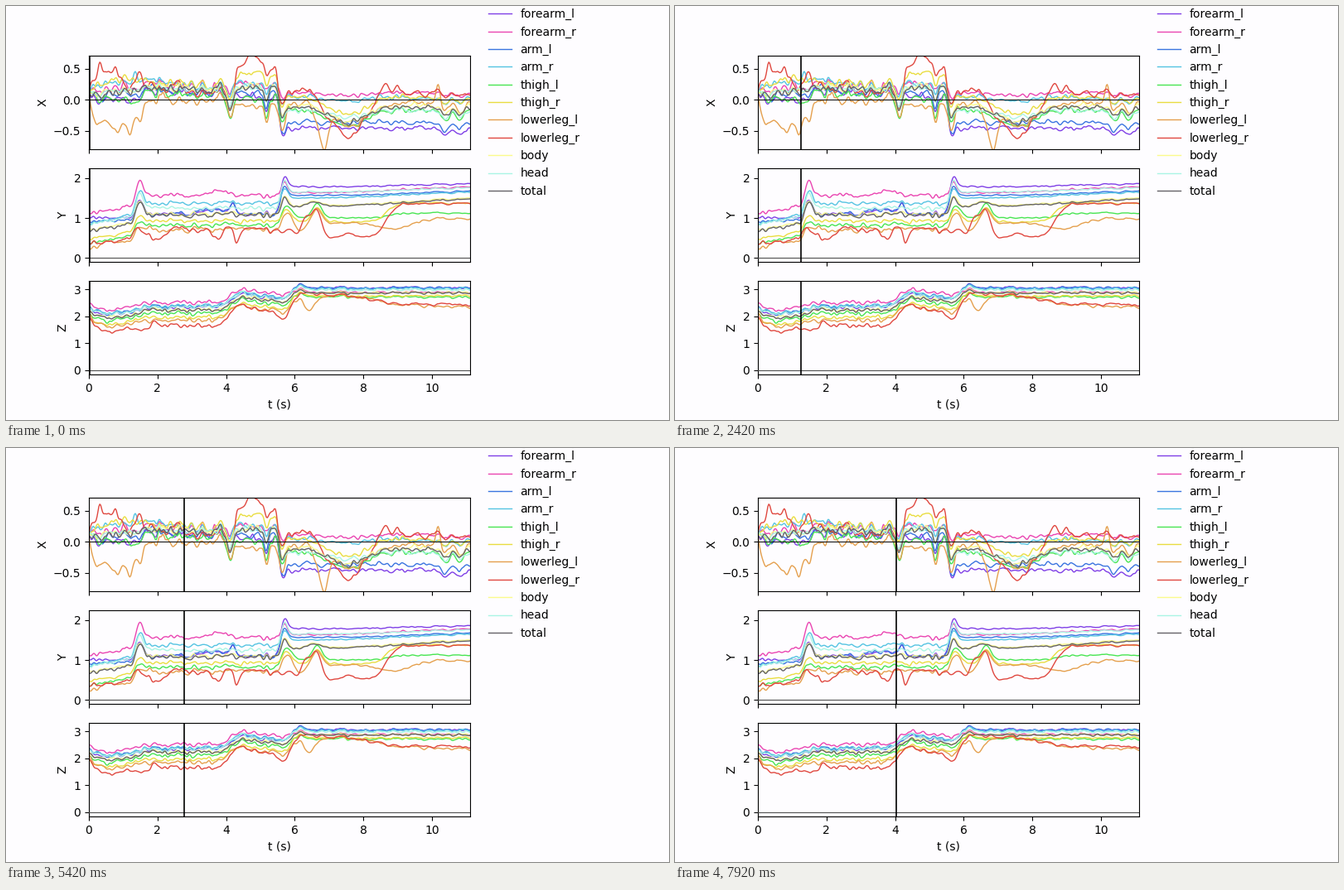
Write a matplotlib script that moves like this. It is 800x500 px and loops after 8 s.

```python
import numpy as np
import matplotlib.pyplot as plt
from matplotlib.animation import FuncAnimation
from matplotlib.lines import Line2D

FRAMES = 96
LOOP_MS = 8000
T_END = 11.115
START, STEP = 0.021, 0.04236  # cursor time and advance per frame, in seconds

COLORS = {
    "forearm_l": "#7f3fe6", "forearm_r": "#ea45b2", "arm_l": "#3a74e0",
    "arm_r": "#55c4e2", "thigh_l": "#48e552", "thigh_r": "#e9dd40",
    "lowerleg_l": "#e5a04e", "lowerleg_r": "#e04840", "body": "#fbfb8c",
    "head": "#aaf5e4", "total": "#646266",
}
LEGS = ("thigh_l", "thigh_r", "lowerleg_l", "lowerleg_r")
SHINS = LEGS[2:]

# first level, middle level, lift, dip, late level, sag
X_MOTION = {
    "forearm_l": (0, .1, -.05, .2, -.46, 0),
    "forearm_r": (.2, .2, .05, .1, .1, .03),
    "arm_l": (.07, .12, 0, .27, -.37, 0),
    "arm_r": (.25, .24, .02, .18, .03, .05),
    "thigh_l": (0, .08, -.06, .34, -.17, .26),
    "thigh_r": (.3, .24, .2, .2, .03, .27),
    "lowerleg_l": (-.39, -.04, -.02, .28, -.04, .42),
    "lowerleg_r": (.44, .13, .48, .2, .1, .73),
    "head": (.14, .17, .03, .25, -.18, .1),
    "total": (.12, .15, .06, .3, -.12, .26),
}
# start level, middle level, late level, end level, kick
Y_MOTION = {
    "forearm_l": (1, 1.1, 1.78, 1.85, .34),
    "forearm_r": (1.1, 1.57, 1.63, 1.78, .36),
    "arm_l": (.88, 1.1, 1.56, 1.67, .3),
    "arm_r": (.85, 1.37, 1.5, 1.65, .34),
    "thigh_l": (.35, .82, 1, 1.12, .12),
    "thigh_r": (.45, .93, .9, 1.37, .14),
    "lowerleg_l": (.25, .72, .88, 1, .05),
    "lowerleg_r": (.35, .72, .5, 1.36, .02),
    "head": (.85, 1.25, 1.65, 1.75, .4),
    "total": (.68, 1.08, 1.28, 1.48, .32),
}
# offset from the total before and after the stand at 5.9 s
Z_OFFSET = {
    "forearm_l": (.12, .2), "forearm_r": (.29, .03), "arm_l": (.15, .2),
    "arm_r": (.17, .17), "thigh_l": (-.1, -.14), "thigh_r": (-.25, -.1),
    "lowerleg_l": (-.35, -.47), "lowerleg_r": (-.52, -.42),
    "head": (.13, .12), "total": (0, 0),
}

plt.rcParams.update({"font.family": "DejaVu Sans", "font.size": 10})
rng = np.random.default_rng(11)
time = np.linspace(0, T_END, 420)


def bump(center, width):
    return np.exp(-0.5 * ((time - center) / width) ** 2)


def rise(center, width):
    return 0.5 + 0.5 * np.tanh((time - center) / width)


def blend(a, b, k):
    return a + (b - a) * k


def jitter(early, late, width=1.5):
    """Smooth seeded noise that calms down after the stand."""
    k = np.arange(-12, 13)
    kernel = np.exp(-0.5 * (k / width) ** 2)
    n = np.convolve(rng.normal(size=time.size + 24), kernel, "valid")
    return n / n.std() * blend(early, late, rise(5.8, 0.2))


def x_curves():
    shake = jitter(.025, .012)
    settle = 1 - np.exp(-time / 0.15)
    lift = (rise(4.27, .06) - rise(5.5, .05)) * (.75 + .25 * bump(4.9, .25))
    dip = (bump(4.1, .1) + bump(5.17, .06) + .5 * bump(5.62, .07)
           + .5 * bump(10.4, .13) + .4 * bump(10.8, .1))
    curves = {}
    for name, (first, mid, up, down, late, sag) in X_MOTION.items():
        v = blend(.1, first, settle)
        v = blend(v, mid + .06 * bump(1.8, .3), rise(1.57, .06))
        v = blend(v, late, rise(5.55, .06))
        curves[name] = v + up * lift - down * dip - sag * bump(7.55, .5) + shake
    curves["arm_r"] += .2 * bump(1.35, .06)
    curves["lowerleg_l"] += (-.15 * bump(1.2, .07) - .3 * bump(5.65, .12)
                             - .53 * bump(6.85, .12) - .15 * bump(6.6, .12)
                             + .28 * bump(10.18, .06))
    curves["lowerleg_r"] += (.2 * bump(.32, .05) - .3 * bump(1.2, .12)
                             + .16 * bump(8.63, .12) + .12 * bump(9, .05)
                             + .07 * bump(6.4, .3))
    return curves


def y_curves():
    sway = jitter(.02, .007)
    curves = {}
    for name, (start, mid, late, end, kick) in Y_MOTION.items():
        v = blend(start, mid, .4 * np.minimum(time / 1.1, 1)
                  + .6 * rise(1.33, .1))
        leg = name in LEGS
        drift = rise(8.65, .3) if leg else np.clip((time - 7) / 4.1, 0, 1)
        v = blend(v, blend(late, end, drift), rise(5.57, .07))
        v += kick * (bump(1.49, .1) + .8 * bump(5.71, .09))
        if leg:
            v += .25 * bump(5.82, .13) + .36 * bump(6.66, .14)
        curves[name] = v + sway
    curves["total"] += .12 * bump(6.6, .2)
    for arm in ("forearm_l", "arm_l"):
        curves[arm] += .12 * bump(3.6, .3) + .22 * bump(4.2, .08)
    curves["forearm_r"] += .13 * bump(3.7, .25)
    curves["lowerleg_l"] -= .25 * bump(9, .5) + .18 * bump(6.15, .15)
    curves["lowerleg_r"] += (.45 * bump(6.3, .12) + .35 * bump(6.6, .15)
                             + .12 * bump(7.6, .15) - .25 * bump(1.95, .2)
                             - .2 * bump(3.75, .12) - .28 * bump(4.3, .07))
    return curves


def z_curves():
    bob = jitter(.035, .018)
    total = (1.98 + .14 * np.exp(-time / .3) + .09 * rise(1.2, .2)
             + .17 * rise(1.57, .05) + .36 * rise(4.05, .18)
             + .27 * rise(5.9, .08) + .1 * bump(4.5, .2)
             - .08 * bump(5.65, .1) + .09 * bump(6.15, .12) + bob)
    curves = {}
    for name, (early, late) in Z_OFFSET.items():
        curves[name] = total + blend(early, late, rise(5.9, .1))
    for shin in SHINS:
        curves[shin] += (.38 * bump(7.3, .8) + .12 * bump(4.3, .2)
                         + .3 * np.exp(-time / .2) - .15 * bump(5.68, .1))
    curves["lowerleg_l"] -= .42 * bump(6.42, .12)
    curves["lowerleg_r"] += (.2 * bump(6.4, .25) + .15 * bump(4.9, .5)
                             - .15 * bump(1.6, .15))
    return curves


fig, axes = plt.subplots(3, 1, sharex=True, figsize=(8, 5), dpi=100,
                         facecolor="#fefdff")
fig.subplots_adjust(left=0.125, right=0.7, top=0.88, bottom=0.11, hspace=0.2)

# label, limits, ticks, curves, noise before and after the stand, zero line
panels = [
    ("X", (-0.803, 0.707), [-0.5, 0, 0.5], x_curves(), .03, .016, "#151515"),
    ("Y", (-0.1, 2.247), [0, 1, 2], y_curves(), .018, .007, "#505050"),
    ("Z", (-0.154, 3.33), [0, 1, 2, 3], z_curves(), .022, .014, "#505050"),
]
cursors = []
for ax, (label, limits, ticks, curves, early, late, zero) in zip(axes, panels):
    curves["body"] = curves["total"] + 0.02
    for name, color in COLORS.items():
        wobble = jitter(early, late)
        if name in SHINS:
            wobble += jitter(1.5 * early, 2 * late, 4)
        ax.plot(time, curves[name] + wobble, color=color, lw=1)
    ax.set_facecolor("#fefdff")
    ax.set(ylabel=label, ylim=limits, yticks=ticks, xlim=(0, T_END))
    ax.axhline(0, color=zero, lw=0.8, zorder=3)
    cursors.append(ax.axvline(START, color="black", lw=1.2, zorder=4))
axes[-1].set(xlabel="t (s)", xticks=range(0, 11, 2))

# Legend column, in pixels from the top left corner
for k, (name, color) in enumerate(COLORS.items()):
    row = 9.2 + 21.37 * k
    fig.add_artist(Line2D([581.5 / 800, 609.5 / 800], [1 - row / 500] * 2,
                          color=color, lw=1))
    fig.text(620.5 / 800, 1 - (row + 4.9) / 500, name, va="baseline")


def update(i):
    for cursor in cursors:
        cursor.set_xdata([START + STEP * i] * 2)
    return cursors


anim = FuncAnimation(fig, update, frames=FRAMES, interval=LOOP_MS / FRAMES,
                     repeat=True, repeat_delay=0)
plt.show()
```
